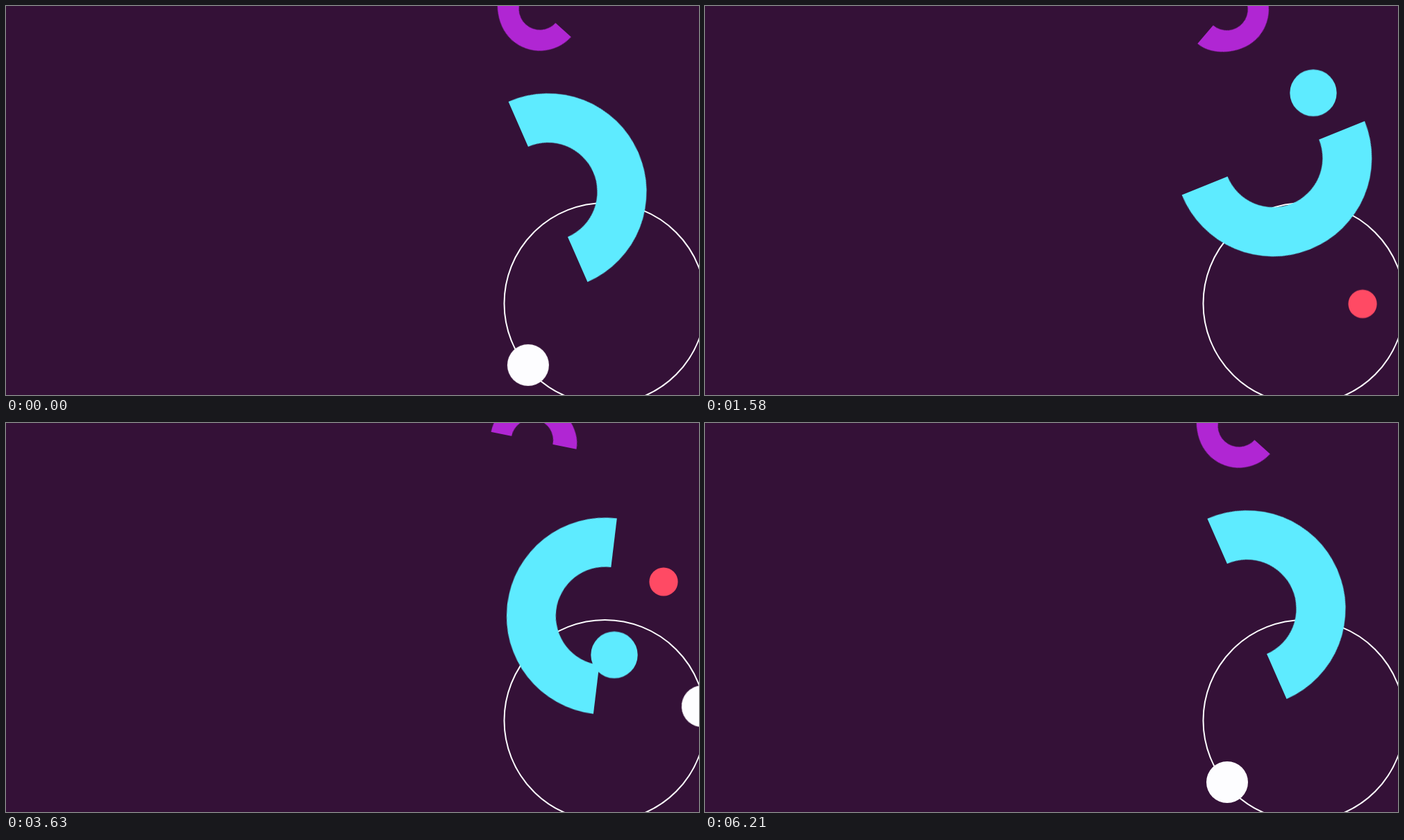
These frames come from a looping animation (998 px wide and 561 px high, 6.25 s). An HTML page without scripts:

```html
<!DOCTYPE html>
<html lang="en">
<head>
<meta charset="utf-8">
<title>Orbiting shapes</title>
<style>
  html, body {
    margin: 0;
    width: 100%;
    height: 100%;
    overflow: hidden;
    background: #341137;
  }
  svg { display: block; width: 100%; height: 100%; }

  .spin, .drift { animation: spin 6250ms linear infinite; }
  .spin { --turn: 360deg; }
  .back { --turn: -360deg; }
  .drift { animation-name: drift; }

  .arch { transform-origin: 823.1px 262px; }
  .hook { transform-origin: 760.5px 13px; }
  .moon { transform-origin: 862.5px 429px; }
  .fall { --from: -36px; --to: 597.3px; }
  .rise { --from: 584.4px; --to: -23.4px; }

  /* each cycle ends with a short rest on the starting pose */
  @keyframes spin {
    0% { transform: rotate(0deg); }
    99.33%, 100% { transform: rotate(var(--turn)); }
  }
  @keyframes drift {
    0% { transform: translateY(var(--from)); }
    99.33%, 100% { transform: translateY(var(--to)); }
  }
</style>
</head>
<body>
<svg viewBox="0 0 998 561" xmlns="http://www.w3.org/2000/svg">
  <circle cx="862.5" cy="429" r="145" fill="none" stroke="#fdfdff" stroke-width="2"/>
  <circle class="spin moon" cx="752" cy="518" r="30" fill="#fdfdff"/>

  <g class="spin back hook">
    <path transform="translate(768.9 4.2) rotate(42.1)" fill="#b026d3"
      d="M60.4 0A60.4 60.4 0 0 1 0 60.4C-32 60.4 -65 30 -65 0H-30.3A30.3 30.3 0 0 0 30.3 0Z"/>
  </g>

  <g class="spin arch">
    <path transform="translate(780.5 268) rotate(246.3)" fill="#5eebff"
      d="M142 0A142 142 0 0 1 -142 0H-71A71 71 0 0 0 71 0Z"/>
  </g>

  <circle class="drift fall" cx="876" r="33.7" fill="#5eebff"/>
  <circle class="drift rise" cx="947" r="20.6" fill="#ff4a64"/>
</svg>
</body>
</html>
```
